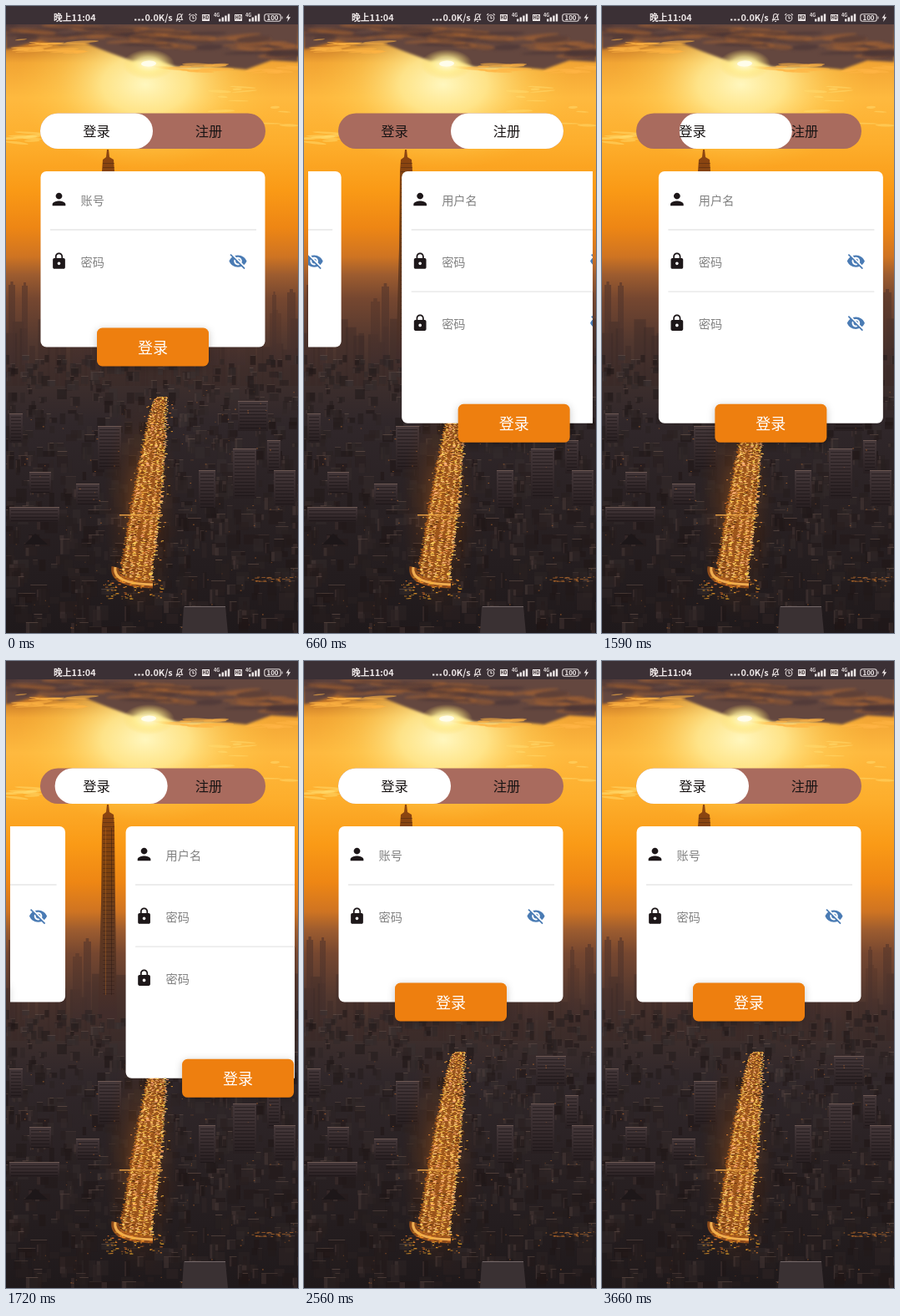
Recreate the animation shown at these times as an HTML page with a canvas. Size 350 px wide and 751 px high, loop 3710 ms.

```html
<!DOCTYPE html>
<html lang="zh">
<head>
<meta charset="utf-8">
<style>
html, body { margin: 0; width: 100%; height: 100%; overflow: hidden; background: #2a2022 }
canvas, svg { position: absolute; left: 0; top: 0; width: 350px; height: 751px }
text { font-family: "Noto Sans CJK SC", "Noto Sans CJK", "Noto Sans", sans-serif }
.tab { font-size: 16.3px; text-anchor: middle; fill: #181414 }
.hint { font-size: 14.2px; fill: #828282 }
.btn { filter: drop-shadow(0 2px 5px rgba(0,0,0,.22)) }
.btn text { font-size: 18px; text-anchor: middle; fill: #fff }
.status { fill: #eee8e8; font-size: 10.8px; font-weight: 700 }
</style>
</head>
<body>
<canvas id="photo" width="350" height="751"></canvas>
<svg viewBox="0 0 350 751">
  <defs>
    <path id="person" d="M12 12c2.21 0 4-1.79 4-4s-1.79-4-4-4-4 1.79-4 4 1.79 4 4 4zm0 2c-2.67 0-8 1.34-8 4v2h16v-2c0-2.66-5.33-4-8-4z"/>
    <path id="lock" d="M18 8h-1V6c0-2.76-2.24-5-5-5S7 3.24 7 6v2H6c-1.1 0-2 .9-2 2v10c0 1.1.9 2 2 2h12c1.1 0 2-.9 2-2V10c0-1.1-.9-2-2-2zm-6 9c-1.1 0-2-.9-2-2s.9-2 2-2 2 .9 2 2-.9 2-2 2zm3.1-9H8.9V6c0-1.71 1.39-3.1 3.1-3.1s3.1 1.39 3.1 3.1v2z"/>
    <path id="eye" d="M12 7c2.76 0 5 2.24 5 5 0 .65-.13 1.26-.36 1.83l2.92 2.92c1.51-1.26 2.7-2.89 3.43-4.75-1.73-4.39-6-7.5-11-7.5-1.4 0-2.74.25-3.98.7l2.16 2.16C10.74 7.13 11.35 7 12 7zM2 4.27l2.28 2.28.46.46C3.08 8.3 1.78 10.02 1 12c1.73 4.39 6 7.5 11 7.5 1.55 0 3.03-.3 4.38-.84l.42.42L19.73 22 21 20.73 3.27 3 2 4.27zM7.53 9.8l1.55 1.55c-.05.21-.08.43-.08.65 0 1.66 1.34 3 3 3 .22 0 .44-.03.65-.08l1.55 1.55c-.67.33-1.41.53-2.2.53-2.76 0-5-2.24-5-5 0-.79.2-1.53.53-2.2zm4.31-.78l3.15 3.15.02-.16c0-1.66-1.34-3-3-3l-.17.01z"/>
    <clipPath id="view"><path d="M5 180h341v400H5z"/></clipPath>
  </defs>

  <g class="status">
    <text x="57" y="17.6">晚上11:04</text>
    <path d="M154 15.6h2.4v2h-2.4zM158.3 15.6h2.4v2h-2.4zM162.6 15.6h2.4v2h-2.4z"/>
    <text x="166.5" y="17.6">0.0K/s</text>
    <g fill="none" stroke="#e2dada" stroke-width="1.1">
      <path d="M204.5 16.5h7l-1-2v-2.5a2.5 2.5 0 0 0-5 0v2.5zM207 18.5h2M204 18.5l8-9"/>
      <circle cx="224" cy="14.5" r="3.8"/>
      <path d="M224 12v2.7h2M219.2 11l2-1.8M228.8 11l-2-1.8"/>
      <rect x="309.8" y="9.8" width="19.4" height="8.4" rx="2.5"/>
      <path d="M331 12.5v3"/>
    </g>
    <path d="M235 10h9v8h-9zM274 10h9v8h-9z"/>
    <g id="bars"></g>
    <text x="319.5" y="17" text-anchor="middle" style="font-size:8px">100</text>
    <path d="M339.5 9l-4 5.5h2.6l-1 4.5 4-5.7h-2.6z"/>
    <g fill="#3b2e31" style="font-size:5.5px" text-anchor="middle">
      <text x="239.5" y="16">HD</text><text x="278.5" y="16">HD</text>
    </g>
    <g style="font-size:5.5px"><text x="249" y="13">4G</text><text x="287" y="13">4G</text></g>
  </g>

  <rect x="41" y="128.5" width="270" height="42.5" rx="21.2" fill="#a96b5e"/>
  <rect id="pill" x="41" y="128.5" width="135" height="42.5" rx="21.2" fill="#fff"/>
  <text class="tab" x="108.5" y="156">登录</text>
  <text class="tab" x="243" y="156">注册</text>
  <g clip-path="url(#view)"><g id="pages"></g></g>
</svg>
<script>
const $ = id => document.getElementById(id);
const W = 350, H = 751, LOOP = 3710, PAGE = 341.5;

// Form pages
const icon = (name, x, y, s, fill) =>
  `<use href="#${name}" fill="${fill}" transform="translate(${x} ${y}) scale(${s}) translate(-12 -12)"/>`;

function field(label, i) {
  const y = 231.5 + i * 74.1;
  return (i ? `<path d="M53 ${y - 37.6}h247" stroke="#e6e6e6" stroke-width="1.3"/>` : '') +
    (i ? icon('lock', 63.5, y, .92, '#1d1719') + icon('eye', 278, y, .96, '#4a7bb4')
       : icon('person', 63.5, y, .98, '#1d1719')) +
    `<text class="hint" x="89.5" y="${y + 6}">${label}</text>`;
}

function page(index, bottom, labels) {
  return `<g transform="translate(${index * PAGE})">
    <rect x="41.5" y="198" width="269" height="${bottom - 198}" rx="7" fill="#fff"/>
    ${labels.map(field).join('')}
    <g class="btn"><rect x="109" y="${bottom - 23}" width="134" height="46" rx="6.5" fill="#ee7f0f"/>
    <text x="176" y="${bottom + 7.5}">登录</text></g></g>`;
}
$('pages').innerHTML = page(0, 408.5, ['账号', '密码']) + page(1, 499.8, ['用户名', '密码', '密码']);
$('bars').innerHTML = [255, 291].map(x => [3, 5, 7, 9].map((h, i) =>
  `<rect x="${x + i * 3.6}" y="${18.5 - h}" width="2.4" height="${h}"/>`).join('')).join('');

// Sunset city backdrop
const c = $('photo').getContext('2d');
let seed = 11;
const rnd = (a = 0, b = 1) => {
  seed = (seed * 16807) % 2147483647;
  return a + (b - a) * seed / 2147483647;
};
const rgb = (r, g, b, a = 1) => `rgba(${r | 0},${g | 0},${b | 0},${a})`;
function box(x, y, w, h, fill) { c.fillStyle = fill; c.fillRect(x, y, w, h); }
function shape(fill, ...p) {
  c.fillStyle = fill;
  c.beginPath();
  for (let i = 0; i < p.length; i += 2) c.lineTo(p[i], p[i + 1]);
  c.fill();
}
function vertical(y0, y1, ...stops) {
  const g = c.createLinearGradient(0, y0, 0, y1);
  stops.forEach(([y, col]) => g.addColorStop((y - y0) / (y1 - y0), col));
  return g;
}
function glow(x, y, r, sx, sy, ...cols) {
  c.save();
  c.translate(x, y);
  c.scale(sx, sy);
  const g = c.createRadialGradient(0, 0, 0, 0, 0, r);
  cols.forEach((col, i) => g.addColorStop(i / (cols.length - 1), col));
  c.fillStyle = g;
  c.fillRect(-r, -r, 2 * r, 2 * r);
  c.restore();
}
function streak(x, y, w, h, fill) {
  c.fillStyle = fill;
  c.beginPath();
  c.ellipse(x, y, w, h, rnd(-.12, .12), 0, 7);
  c.fill();
}

function sky() {
  box(0, 0, W, H, vertical(0, H, [0, '#493b40'], [22, '#6b4a42'], [45, '#c07327'], [68, '#f2a534'],
    [110, '#feb93f'], [165, '#fdae2c'], [220, '#fa9a16'], [265, '#ee8614'], [300, '#cf7422'],
    [322, '#9d5c2f'], [350, '#764730'], [400, '#53382f'], [440, '#40302d'], [500, '#30272a'], [600, '#292123'], [H, '#1f191b']));
  glow(167, 94, 120, 1.3, .85, 'rgba(255,247,190,1)', 'rgba(255,236,150,.85)', 'rgba(255,212,95,.4)', 'rgba(255,195,60,0)');
  c.filter = 'blur(1.5px)';
  shape('#64473f', 0, 20, 350, 20, 350, 67, 318, 65, 288, 76, 245, 72, 205, 73, 178, 64, 152, 66, 122, 55,
    94, 44, 66, 47, 40, 41, 20, 47, 0, 52);
  for (let i = 0; i < 60; i++) {
    const x = rnd(0, W), y = rnd(22, 40) + Math.max(0, x - 90) * .08;
    streak(x, y, rnd(12, 38), rnd(1, 4), rnd() < .5 ? rgb(72, 52, 54, .6) : rgb(196, 112, 46, .35));
  }
  c.filter = 'blur(.7px)';
  for (let i = 0; i < 36; i++) {
    const left = rnd() < .5;
    streak(left ? rnd(0, 110) : rnd(190, 350), left ? rnd(40, 56) : rnd(70, 80), rnd(6, 25), rnd(.7, 2), rgb(255, 180, 68, .6));
  }
  for (let i = 0; i < 24; i++) {
    const left = rnd() < .5;
    streak(left ? rnd(0, 70) : rnd(240, 350), left ? rnd(148, 164) : rnd(95, 160), rnd(5, 20), rnd(.6, 1.7), rgb(255, 220, 110, .5));
  }
  c.filter = 'none';
  glow(171, 70, 26, 1.2, .7, '#fffbe0', 'rgba(255,240,150,.75)', 'rgba(255,220,100,0)');
  streak(171, 69, 9, 3.5, '#fffdeb');
  box(0, 0, W, 22, '#3b3035');
}

function skyline() {
  for (let x = 0; x < W; x += rnd(5, 13)) {
    const y = rnd(372, 412);
    box(x, y, rnd(6, 17), 455 - y, rgb(58, 41, 39, .4));
  }
  c.globalAlpha = .75;
  for (const [x, y, w] of [[3, 334, 8], [19, 335, 7], [80, 354, 11], [93, 336, 9], [185, 307, 7], [211, 358, 12],
    [231, 330, 24], [262, 361, 25], [316, 368, 14], [319, 346, 5], [337, 343, 10]]) {
    box(x, y, w, 430 - y, vertical(y, 430, [y, '#5e3a2b'], [430, '#402e2d']));
    box(x + w * .3, y - 4, w * .4, 4, '#5e3a2b');
  }
  c.globalAlpha = 1;
  const tone = vertical(172, 420, [172, '#8c4511'], [250, '#7c420f'], [320, '#63391f'], [420, '#422d2b']);
  shape(tone, 121, 172, 123, 172, 124, 181, 129, 184, 130, 198, 131, 290, 133, 430, 110, 430, 114, 290, 115, 198, 116, 184, 120, 181);
  for (let y = 188; y < 400; y += 5) box(116, y, 14, 1, 'rgba(45,24,18,.35)');
  box(119, 200, 1, 200, 'rgba(220,125,35,.3)');
  box(126, 200, 1, 200, 'rgba(35,20,18,.4)');
}

function city() {
  for (let y = 418; y < 745; y += 5) {
    const k = (y - 418) / 327;
    for (let i = 0; i < 15 - 5 * k; i++) {
      const x = rnd(-15, W), w = rnd(4, 10 + 12 * k), h = rnd(5, 14 + 8 * k), v = rnd(21, 50 - 12 * k);
      box(x, y, w, h, rgb(v + 10, v + 1, v + 1, .6));
      if (rnd() < .3) box(x, y, w, 1, rgb(120, 96, 86, rnd(.15, .5)));
      if (rnd() < .3) box(x, y + 1, w * .3, h - 1, rgb(92, 74, 70, .3));
    }
  }
  for (const [x, y, w, h] of [[4, 488, 16, 35], [110, 503, 28, 52], [278, 473, 36, 36], [272, 530, 28, 60],
    [313, 520, 16, 40], [28, 558, 26, 25], [321, 556, 26, 43], [231, 556, 20, 45], [84, 572, 28, 25], [4, 600, 60, 18]]) {
    box(x, y, w, h, vertical(y, y + h, [y, '#45383a'], [y + h, '#281f21']));
    box(x, y, w, 1, '#6d5853');
    for (let i = 4; i < h; i += 4) box(x + 2, y + i, w - 4, 1, 'rgba(20,14,17,.5)');
  }
  shape('#3a3133', 213, 719, 263, 719, 266, 751, 211, 751);
  box(214, 719, 49, 1, '#75696a');
  shape('#1d1719', 22, 645, 35, 632, 50, 645);
  for (let i = 0; i < 130; i++) box(rnd(0, W), rnd(460, 745), rnd(.8, 2), 1, rgb(220, 126, 52, rnd(.2, .65)));
}

// Left and right edges of the lit avenue at height y
function avenue(y) {
  const k = (y - 468) / 222;
  return [178 - 45 * Math.pow(k, .75), 194 - 20 * k + 4 * Math.sin(k * 3)];
}
function road() {
  glow(162, 600, 120, .38, 1.15, 'rgba(205,110,24,.5)', 'rgba(145,70,15,.2)', 'rgba(90,40,10,0)');
  for (let y = 468; y < 690; y++) {
    const [l, r] = avenue(y), w = r - l;
    const x = l + rnd(0, 4);
    box(x, y, r - x - rnd(0, 4), 1, 'rgba(170,92,28,.85)');
    for (const f of [.12, .3, .52, .72, .9]) {
      box(l + w * f + rnd(-2, 2), y, rnd(1, w * .13), 1, rgb(255, rnd(165, 225), rnd(70, 135), rnd(.45, 1)));
    }
    if (rnd() < .5) box(l + rnd(0, w), y, rnd(2, 5), 2, rgb(75, 37, 16, .65));
    if (rnd() < .5) box(rnd(l - 5, r + 6), y, rnd(1, 3), 1.2, rgb(255, rnd(135, 195), 60, .7));
  }
  for (const [width, col] of [[9, 'rgba(165,85,25,.8)'], [3, '#f0ad50']]) {
    c.strokeStyle = col;
    c.lineWidth = width;
    c.beginPath();
    c.moveTo(131, 672);
    c.quadraticCurveTo(127, 692, 176, 693);
    c.stroke();
  }
  box(136, 609, 52, 1.5, '#e49c42');
  for (let i = 0; i < 90; i++) box(rnd(116, 187), rnd(683, 710), rnd(1, 4), 1.2, rgb(255, rnd(125, 195), 45, rnd(.35, .9)));
  for (let i = 0; i < 32; i++) box(rnd(288, 350), 686 + rnd(-3, 3), rnd(1, 5), 1, rgb(205, 119, 45, .6));
}
sky();
skyline();
city();
road();

// Motion
const clamp = v => Math.max(0, Math.min(1, v));
const ease = v => v < .5 ? 4 * v ** 3 : 1 - 4 * (1 - v) ** 3;
const span = (t, start, length) => clamp((t - start) / length);

function draw(now) {
  const t = now % LOOP;
  const tab = span(t, 100, 427) - span(t, 1275, 513);
  const scroll = ease(span(t, 135, 850)) - ease(span(t, 1363, 850));
  $('pill').setAttribute('x', 41 + 135 * tab);
  $('pages').setAttribute('transform', `translate(${-PAGE * scroll})`);
}
const begin = performance.now();
function tick() {
  draw(performance.now() - begin);
  requestAnimationFrame(tick);
}
tick();
</script>
</body>
</html>
```
